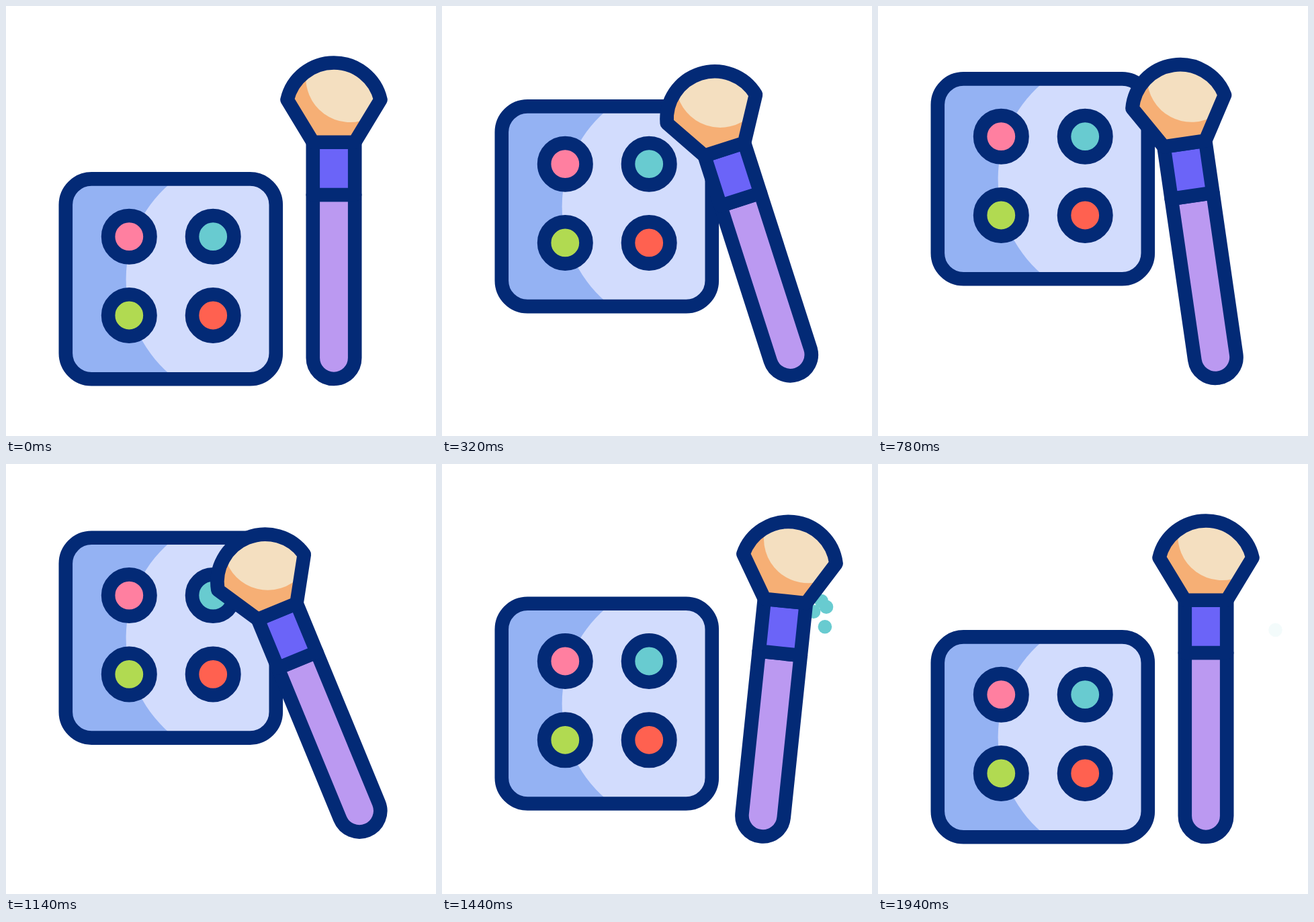
Animation of 640 by 640 pixels, one loop 2.4 s. Source, as an HTML page:

```html
<!DOCTYPE html>
<html lang="en">
<head>
<meta charset="utf-8">
<title>Makeup palette and brush</title>
<style>
  html, body { margin: 0; height: 100%; overflow: hidden; background: #fff; }
  svg { display: block; width: 100%; height: 100%; }
  .line { stroke: #032a76; stroke-width: 20.6; stroke-linejoin: round; }
</style>
</head>
<body>
<svg viewBox="0 0 640 640">
  <g id="palette">
    <rect x="88.8" y="257.4" width="313" height="297.8" rx="38.5" fill="#94b2f3"/>
    <path fill="#d2dcfd" d="M252.5 257.4A187 187 0 0 0 252.5 555.2H363.3a38.5 38.5 0 0 0 38.5-38.5V295.9a38.5 38.5 0 0 0-38.5-38.5z"/>
    <rect class="line" x="88.8" y="257.4" width="313" height="297.8" rx="38.5" fill="none"/>
    <g class="line">
      <circle cx="183.3" cy="343.2" r="31.2" fill="#ff7fa0"/>
      <circle cx="308.2" cy="343.2" r="31.2" fill="#68cbd0"/>
      <circle cx="183.3" cy="460.5" r="31.2" fill="#b1da51"/>
      <circle cx="308.2" cy="460.5" r="31.2" fill="#ff6150"/>
    </g>
  </g>
  <g id="dust" fill="#68cbd0"></g>
  <g id="brush">
    <path class="line" fill="#bb99f1" d="M456.8 281V523.8a31.2 31.2 0 0 0 62.4 0V281z"/>
    <path class="line" fill="#6b64f8" d="M456.8 202.7h62.4V281h-62.4z"/>
    <path fill="#f6af75" d="M418.5 139.5A71.4 71.4 0 0 1 557.5 139.5L519.2 202.7H456.8z"/>
    <path fill="#f4dfc0" d="M447 97.4A66 66 0 0 0 541 166.5L557.5 139.5A71.4 71.4 0 0 0 447 97.4z"/>
    <path class="line" fill="none" d="M418.5 139.5A71.4 71.4 0 0 1 557.5 139.5L519.2 202.7H456.8z"/>
  </g>
</svg>
<script>
const LOOP = 2400;
const $ = id => document.getElementById(id);
const clamp = u => Math.min(1, Math.max(0, u));
const smooth = u => u * u * (3 - 2 * u);

// [time, value] keys, eased in and out between neighbours
const lift = [[0, 0], [490, -149], [1110, -149], [1650, 0]];
const tilt = [[0, 0], [570, -30], [800, -7.8], [1068, -30], [1290, 0], [1450, 6], [1776, 0]];

function at(keys, t) {
  let value = keys[0][1];
  for (let i = 1; i < keys.length; i++) {
    const [t0, a] = keys[i - 1], [t1, b] = keys[i];
    if (t >= t0) value = a + (b - a) * smooth(clamp((t - t0) / (t1 - t0)));
  }
  return value;
}

// Reach of each speck from the brush, and when it has faded away
const origin = { x: 545, y: 185 };
const specks = [
  { dx: 46.5, dy: 62, end: 1960 },
  { dx: 63.6, dy: 90, end: 1920 },
  { dx: 19, dy: 112.5, end: 1880 },
  { dx: 58.7, dy: 185.5, end: 1840 }
];
for (const s of specks) {
  s.el = document.createElementNS("http://www.w3.org/2000/svg", "circle");
  s.el.setAttribute("r", 10.3);
  $("dust").append(s.el);
}

function draw(now) {
  const t = now % LOOP;
  $("palette").setAttribute("transform", `translate(0 ${at(lift, t)})`);
  $("brush").setAttribute("transform", `rotate(${at(tilt, t)} 488 424)`);
  const rest = 1 - clamp((t - 1340) / 600);
  for (const { el, dx, dy, end } of specks) {
    el.setAttribute("cx", origin.x + dx * (1 - rest ** 3));
    el.setAttribute("cy", origin.y + dy * (1 - rest ** 2));
    el.setAttribute("opacity", Math.min(clamp((t - 1340) / 60), clamp((end - t) / 240)));
  }
  requestAnimationFrame(draw);
}
draw(0);
</script>
</body>
</html>
```
